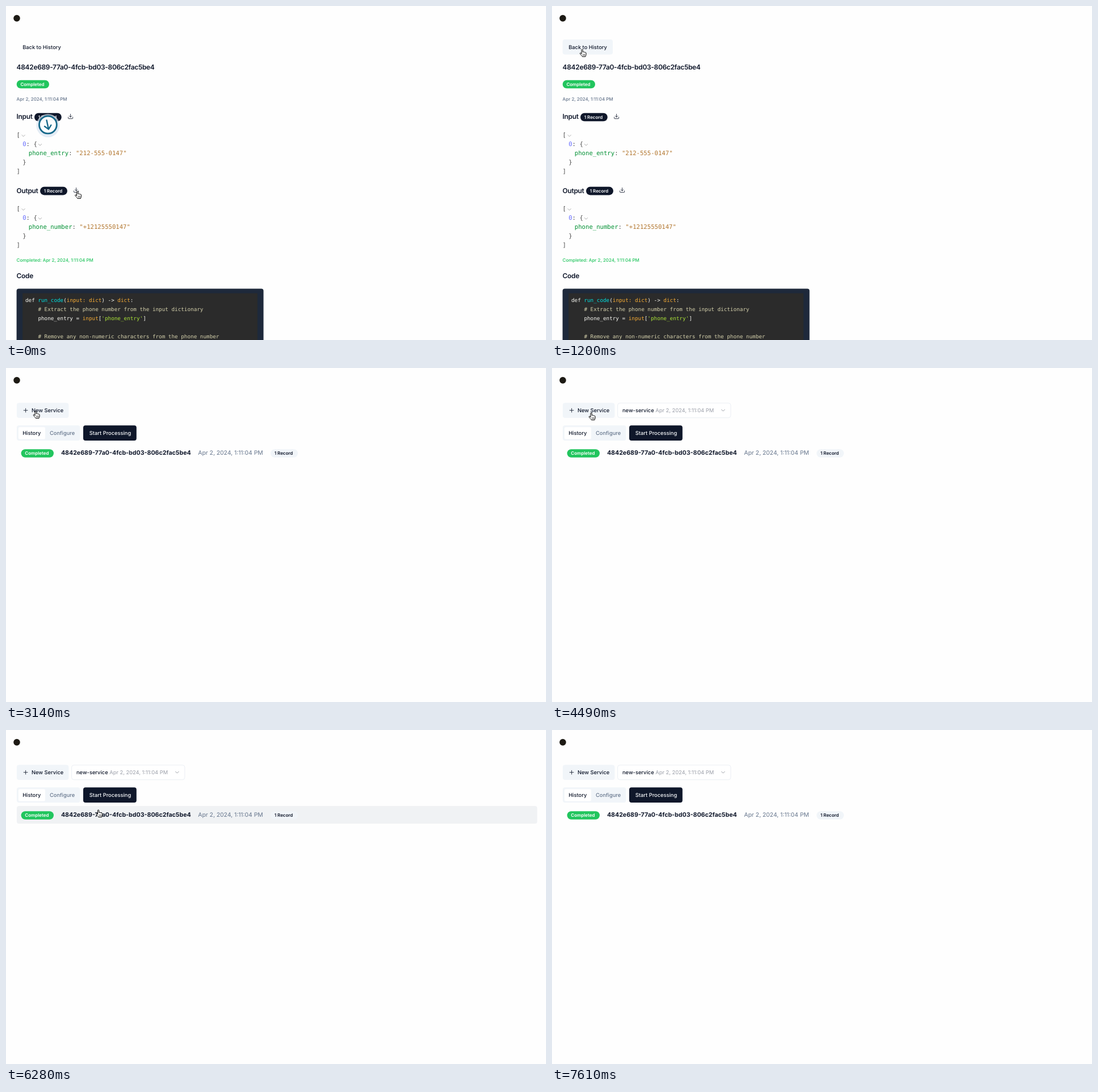
Recreate the animation shown at these times as an HTML page. Size 951x589 px, loop 8650 ms.

```html
<!DOCTYPE html>
<html lang="en">
<head>
<meta charset="utf-8">
<title>Service history</title>
<style>
  html, body { margin: 0; width: 100%; height: 100%; overflow: hidden; background: #fefefe; }
  svg { display: block; }
  text { white-space: pre; text-rendering: geometricPrecision; font-family: Inter, sans-serif; }
  .mono { font-family: "DejaVu Sans Mono", monospace; }
  .line { fill: none; stroke-linecap: round; stroke-linejoin: round; }
</style>
</head>
<body>
<svg id="stage" width="951" height="589" viewBox="0 0 951 589"></svg>
<script>
const INK = '#0f172a', SLATE = '#64748b', PALE = '#f1f5f9', GREEN = '#22c55e';
const SMALL = 7.97, BODY = 9.3, BASE = 10.63, LARGE = 11.95;
const ID = '4842e689-77a0-4fcb-bd03-806c2fac5be4';
const DATE = 'Apr 2, 2024, 1:11:04 PM';

const text = (x, y, content, size, weight = 500, fill = INK, extra = '') =>
  `<text x="${x}" y="${y}" font-size="${size}" font-weight="${weight}" fill="${fill}" ${extra}>${content}</text>`;
const heading = (x, y, content) => text(x, y, content, LARGE, 600, INK, 'letter-spacing="-0.025em"');
const mono = (x, y, content, size, fill) => text(x, y, content, size, 400, fill, 'class="mono"');
const box = (x, y, w, h, fill, r = 4, extra = '') =>
  `<rect x="${x}" y="${y}" width="${w}" height="${h}" rx="${r}" fill="${fill}" ${extra}/>`;
const line = (d, stroke, width) => `<path class="line" d="${d}" stroke="${stroke}" stroke-width="${width}"/>`;
const span = (fill, content) => `<tspan fill="${fill}">${content}</tspan>`;
const pill = (x, y, w, label, fill, color) =>
  box(x, y, w, 14.6, fill, 7.3) + text(x + 6.7, y + 10.15, label, SMALL, 600, color);
const chevron = (x, y, size, color) =>
  line(`M${x - size} ${y - size / 2}l${size} ${size} ${size} ${-size}`, color, .8);
const download = (x, y) =>
  line(`M${x - 4} ${y + 1.3}v1.8q0 .9 .9 .9h6.2q.9 0 .9 -.9v-1.8M${x} ${y - 4}v5.3M${x - 2.2} ${y - .9}l2.2 2.2 2.2 -2.2`, INK, .85);

function jsonBlock(y, key, value) {
  const gray = '#4d4d4d', pitch = 15.9;
  return mono(18.6, y, '[', BASE, gray) + chevron(30.6, y - 2.2, 2.7, '#999') +
    mono(29.2, y + pitch, span('#676dff', '0') + ': {', BASE, gray) + chevron(60, y + pitch - 2.2, 2.7, '#999') +
    mono(39.8, y + 2 * pitch, `${span('#009033', key)}: ${span('#b2762e', `"${value}"`)}`, BASE, gray) +
    mono(29.2, y + 3 * pitch, '}', BASE, gray) + mono(18.6, y + 4 * pitch, ']', BASE, gray);
}

function codeBlock() {
  const orange = '#f5ab35', note = '#d4d0ab';
  const rows = [
    `def ${span('#00e0e0', 'run_code')}(${span(orange, 'input: dict')}) -&gt; ${span(orange, 'dict')}:`,
    span(note, '    # Extract the phone number from the input dictionary'),
    `    phone_entry = ${span(orange, 'input')}[${span('#abe338', "'phone_entry'")}]`,
    '',
    span(note, '    # Remove any non-numeric characters from the phone number')
  ];
  return box(18.6, 498.6, 434.9, 110, '#1e293b') + box(29.2, 506.5, 413.6, 100, '#2b2b2b', 0) +
    rows.map((row, i) => mono(34, 522.3 + i * 15.95, row, BODY, '#f8f8f2')).join('');
}

const detailPage =
  box(18.7, 59, 88.3, 26.5, PALE, 4, 'id="backHover"') +
  text(29.2, 75.5, 'Back to History', BODY) +
  heading(18.6, 112.4, ID) +
  pill(18.7, 130.7, 57.3, 'Completed', GREEN, '#fff') +
  text(18.6, 166.6, DATE, SMALL, 500, SLATE) +
  heading(18.6, 199.2, 'Input') + pill(50, 188.7, 47.8, '1 Record', INK, '#f8fafc') + download(113.6, 194.7) +
  jsonBlock(231, 'phone_entry', '212-555-0147') +
  heading(18.6, 329.5, 'Output') + pill(60, 318.8, 48, '1 Record', INK, '#f8fafc') + download(123.6, 324.7) +
  jsonBlock(361.1, 'phone_number', '+12125550147') +
  text(18.6, 450.9, 'Completed: ' + DATE, SMALL, 500, GREEN) +
  heading(18.6, 480.2, 'Code') +
  codeBlock();

const selectBox =
  box(115.6, 61.9, 199.2, 25.8, '#fff', 4, 'stroke="#e2e8f0" stroke-width=".7"') +
  text(124, 78.1, 'new-service', BODY) +
  text(182.3, 78.1, DATE, BODY, 400, '#9a9ea8') +
  chevron(301.4, 74.7, 2.8, '#82868f');

const historyPage =
  box(19, 61.6, 91.4, 26.5, PALE) + line('M31.2 74.7h6.8M34.6 71.3v6.8', INK, .85) +
  text(45, 78.1, 'New Service', BODY) +
  `<g id="select">${selectBox}</g>` +
  box(19, 101.3, 111.5, 26.6, PALE) + box(21.9, 104.2, 47.2, 21.2, '#fff', 2.6) +
  text(29.2, 118.1, 'History', BODY) + text(77, 118.1, 'Configure', BODY, 500, SLATE) +
  box(136, 101.3, 93.8, 26.6, INK) + text(146.8, 118.1, 'Start Processing', BODY, 500, '#f8fafc') +
  box(19, 134, 916.5, 31.2, '#f0f2f4', 4, 'id="rowHover"') +
  pill(26.6, 143.2, 57.4, 'Completed', GREEN, '#fff') +
  text(96.9, 153.4, ID, BASE, 700) +
  text(338.3, 153.4, DATE, 10.35, 400, SLATE) +
  pill(466, 143.2, 48, '1 Record', PALE, INK);

const scrollBadge =
  '<circle cx="73.9" cy="211" r="20.5" fill="#dbe5f2" opacity=".7"/>' +
  '<circle cx="73.9" cy="209.5" r="15.4" fill="#fff" fill-opacity=".93" stroke="#17698a" stroke-width="2.8"/>' +
  line('M71.6 201.4L75 217.4M68 212.2L75 217.4L79.4 210', '#17698a', 2.4);

const hand =
  '<path d="M4 9V2C4 .5 6.2 .5 6.2 2V5.7C6.5 4.8 8.2 4.9 8.3 6C8.7 5.3 10.2 5.5 10.3 6.6C10.8 6 12.1 6.3 12.1 7.5V10C12.1 11.8 11.1 12.4 11 13.7H5.4C5 12.5 3.2 11 1.5 8.8C.6 7.4 2.1 6.5 3.1 7.7Z" ' +
  'fill="#fff" stroke="#000" stroke-width="1" stroke-linejoin="round"/>' +
  line('M6.6 9.2v2.8M8.4 9.2v2.8M10 9.2v2.8', '#000', .6);
const arrow =
  '<path d="M0 0V11.2L2.6 8.8 4.4 12.8 6.3 12 4.6 8.1H8Z" fill="#000" stroke="#fff" stroke-width=".9"/>';

const group = (id, content) => `<g id="${id}">${content}</g>`;
document.getElementById('stage').innerHTML =
  '<circle cx="19" cy="21.6" r="5.8" fill="#1d1a14"/>' +
  group('detail', detailPage) + group('history', historyPage) + group('badge', scrollBadge) +
  group('cursor', group('hand', hand) + group('arrow', arrow));

// Cursor stops: time, x, y, shape
const stops = [
  [0, 120.5, 325.8, 'hand'], [300, 120, 323, 'hand'], [450, 68, 234, 'arrow'],
  [600, 31, 67, 'hand'], [900, 33, 66, 'hand'], [1050, 48, 75, 'hand'], [1200, 48, 75.6, 'hand'],
  [2400, 47, 75.6, 'hand'], [2850, 47, 75, 'hand'], [4490, 64, 78, 'hand'],
  [4640, 100, 92, 'arrow'], [4780, 154, 129, 'arrow'],
  [4930, 159, 139, 'hand'], [5080, 158.5, 140, 'hand'], [6280, 157.5, 140, 'hand'],
  [6420, 157, 139, 'hand'], [7170, 156, 137, 'hand'], [7320, 156, 132, 'hand'],
  [7470, 161, 135, 'arrow'], [7610, 0, 0, 'none']
];

const part = id => document.getElementById(id);
const show = (id, on) => part(id).setAttribute('visibility', on ? 'inherit' : 'hidden');

function render() {
  const t = performance.now() % 8650;
  const [, x, y, shape] = stops.findLast(stop => stop[0] <= t);
  show('detail', t < 3140);
  show('history', t >= 3140);
  show('backHover', t >= 600 && t < 3140);
  show('select', t >= 3290);
  show('rowHover', t >= 4930 && t < 7470);
  part('badge').setAttribute('opacity', t < 150 ? 1 : t < 300 ? .6 : t < 450 ? .25 : 0);
  part('cursor').setAttribute('transform', `translate(${x} ${y})`);
  show('hand', shape === 'hand');
  show('arrow', shape === 'arrow');
  requestAnimationFrame(render);
}
render();
</script>
</body>
</html>
```
